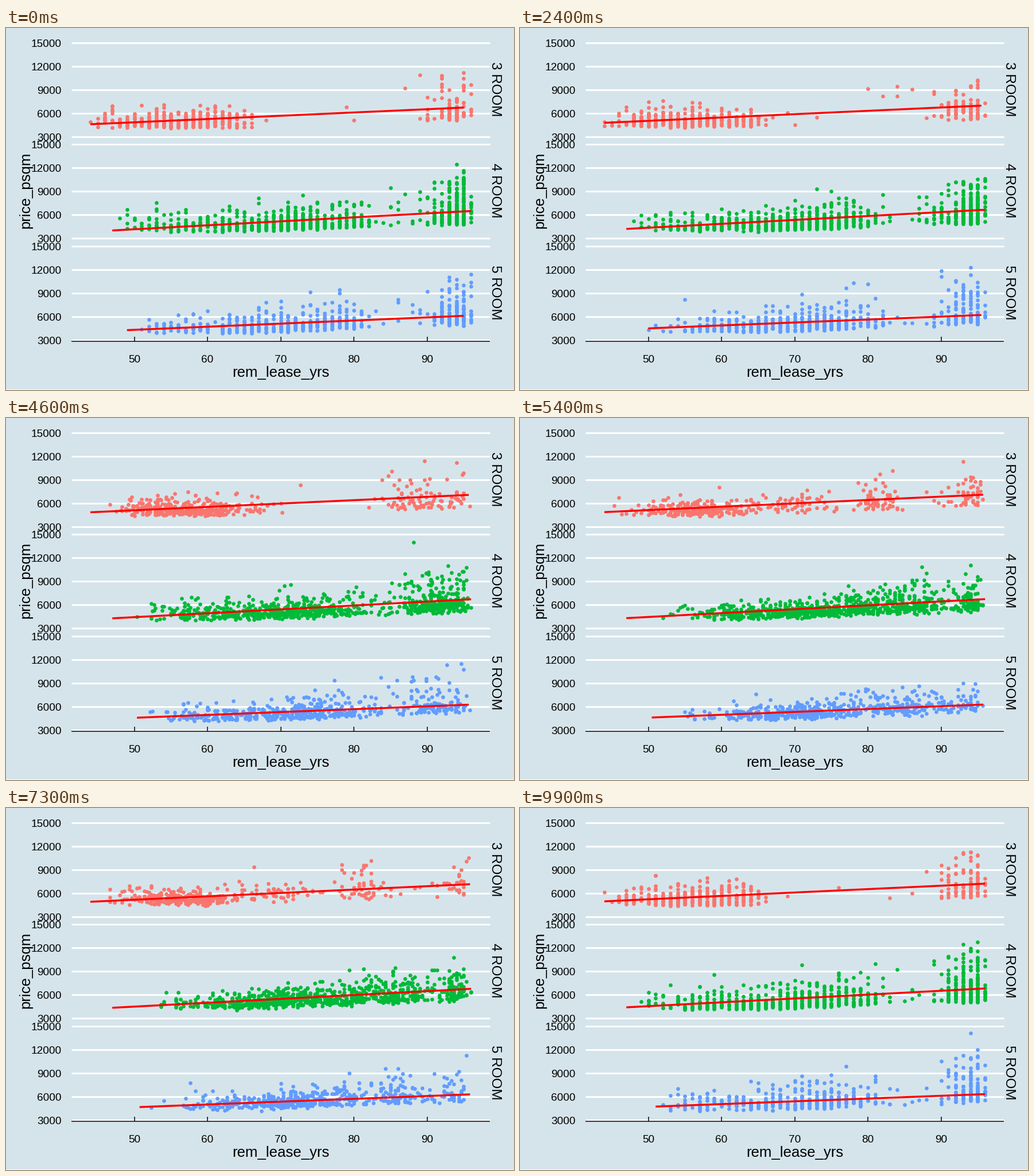
A matplotlib script for the animation above (10000 ms loop, 885 by 632 pixels).

```python
from collections import namedtuple

import numpy as np
import matplotlib.pyplot as plt
from matplotlib.animation import FuncAnimation

W, H, DPI = 885, 632, 64
PT = 72 / DPI                      # points per pixel
FRAMES = 100
LEFT, RIGHT = 114, 843
TOP_BASE, PITCH = 189, 177.5       # row of price 3000, panel spacing

# Frames at which each of the 18 months is fully shown; one month is short
MONTHS = np.round(np.interp(range(18), (0, 8, 11, 17),
                            (0, 47, 63, 99))).astype(int)

# old: lease range (low, mode, high) of older flats; new: share of new ones
# first, last: ends of the trend line (year, price, year, price)
Panel = namedtuple("Panel", "color sales old new floor first last")
PANELS = (
    Panel("#F8766D", 430, (43.6, 58, 67), .22, 4050,
          (44, 4570, 95, 6700), (44, 4940, 96, 7200)),
    Panel("#00BA38", 850, (48, 73, 84), .33, 3750,
          (47, 3990, 96, 6475), (47, 4390, 96, 6800)),
    Panel("#619CFF", 520, (50, 74, 84), .26, 3800,
          (49, 4245, 95, 6070), (51, 4700, 96, 6290)),
)


def px(year):
    return 223.5 + (np.asarray(year) - 50) * 12.755


def py(price, i):
    return TOP_BASE + PITCH * i + .5 - (np.asarray(price) - 3000) * 41 / 3000


def month_sales(rng, p, progress):
    """Random sales of one month as rows of (year, price)."""
    n = p.sales
    kind = rng.random(n)
    year = rng.triangular(*p.old, n)
    year = np.where(kind < p.new, 95.9 - rng.gamma(1.8, 1.4, n), year)
    year = np.where(kind > .97, rng.uniform(p.old[0], 96.4, n), year)
    year = np.clip(np.round(year), 44, 96)

    # Newer flats cost more and spread further upwards
    fresh = np.clip((year - 65) / 30, 0, 1)
    price = p.floor * (1 + .25 * fresh) + rng.gamma(2.2, 420 + 100 * fresh)
    dear = rng.random(n) < .07 + .2 * fresh
    price += dear * rng.uniform(.15, 1, n) * (2000 + 2800 * fresh)
    price *= 1 + .07 * progress

    # Loosely ordered by lease, so that many sales move only a little
    order = np.argsort(year + rng.normal(0, 30, n))
    return np.column_stack([year, price])[order]


def tween(months, frame):
    k = min(np.searchsorted(MONTHS, frame, side="right"), len(MONTHS) - 1)
    t = (frame - MONTHS[k - 1]) / (MONTHS[k] - MONTHS[k - 1])
    return months[k - 1] * (1 - t) + months[k] * t


rng = np.random.default_rng(12)
sales = [[month_sales(rng, p, t) for t in np.linspace(0, 1, len(MONTHS))]
         for p in PANELS]

plt.rcParams["font.family"] = "Liberation Sans"
fig = plt.figure(figsize=(W / DPI, H / DPI), dpi=DPI, facecolor="white")
ax = fig.add_axes([0, 0, 1, 1])
ax.set(xlim=(0, W), ylim=(H, 0))
ax.axis("off")
ax.add_patch(plt.Rectangle((0, 0), W, H - 1, fc="#D5E4EB", lw=0, zorder=0))


def segment(xs, ys, color, width, z):
    return ax.plot(xs, ys, color=color, lw=width * PT, zorder=z,
                   solid_capstyle="butt")[0]


def label(x, y, text, size, ha="center", rotation=0):
    ax.text(x, y, text, fontsize=size * PT, ha=ha, va="baseline",
            rotation=rotation, rotation_mode="anchor", color="black", zorder=6)


dots, trends = [], []
for i, p in enumerate(PANELS):
    for price in range(3000, 15001, 3000):
        y = py(price, i)
        segment((LEFT, RIGHT), (y, y), "white", 3, 1)
        label(96.5, y + 7.2, str(price), 19, ha="right")
    label(845.5, py(9000, i) - 1, f"{i + 3} ROOM", 24.3, rotation=-90)
    dots.append(ax.scatter([], [], s=(6.7 * PT) ** 2, c=p.color, lw=0,
                           zorder=3))
    trends.append(segment([], [], "red", 3.4, 4))

segment((LEFT, RIGHT), (547, 547), "black", 1.5, 2)
for year in range(50, 91, 10):
    x = px(year)
    segment((x, x), (539, 547), "black", 1.5, 2)
    label(x, 584, str(year), 19)
label(478.5, 608.5, "rem_lease_yrs", 25.8)
label(41, 283.5, "price_psqm", 25.8, rotation=90)


def update(frame):
    ease = np.sqrt(frame / (FRAMES - 1))
    for i, p in enumerate(PANELS):
        year, price = tween(sales[i], frame).T
        dots[i].set_offsets(np.column_stack([px(year), py(price, i)]))
        first, last = np.array(p.first), np.array(p.last)
        x0, y0, x1, y1 = first + (last - first) * ease
        trends[i].set_data(px([x0, x1]), py([y0, y1], i))
    return dots + trends


anim = FuncAnimation(fig, update, frames=FRAMES, interval=100,
                     repeat=True, repeat_delay=0, blit=False)
plt.show()
```
